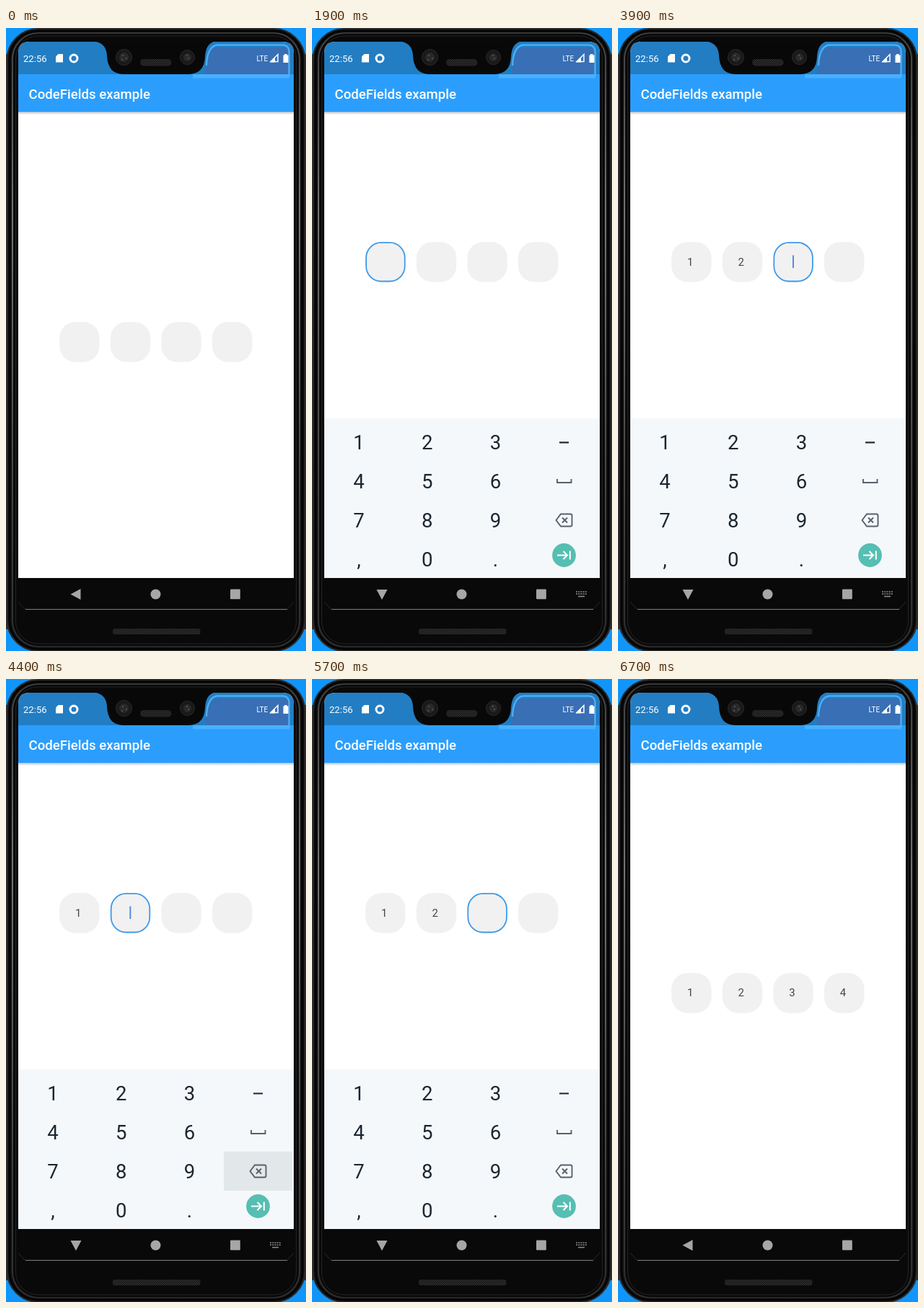
An HTML page that plays this animation: 416x862 px, repeating every 7500 ms.

```html
<!DOCTYPE html>
<html lang="en">
<head>
<meta charset="utf-8">
<title>CodeFields example</title>
<style>
  html, body { margin: 0; width: 100%; height: 100%; overflow: hidden; background: #1095fa; }
  svg { display: block; width: 416px; height: 862px; font-family: Roboto, sans-serif; }
</style>
</head>
<body>
<svg viewBox="0 0 416 862" xmlns="http://www.w3.org/2000/svg">
  <defs>
    <linearGradient id="metal" x1="0" y1="0" x2="0" y2="1">
      <stop offset="0" stop-color="#444"/>
      <stop offset=".3" stop-color="#858585"/>
      <stop offset=".6" stop-color="#5c5c5c"/>
      <stop offset="1" stop-color="#303030"/>
    </linearGradient>
    <linearGradient id="shade" x1="0" y1="0" x2="0" y2="1">
      <stop offset="0" stop-color="#b9c4ce"/>
      <stop offset="1" stop-color="#fff"/>
    </linearGradient>
    <pattern id="mesh" width="3" height="3" patternUnits="userSpaceOnUse">
      <rect width="3" height="3" fill="#2b2b2b"/>
      <path d="M0 3L3 0" stroke="#121212"/>
    </pattern>
    <clipPath id="display"><path d="M17 761V35Q17 19 33 19H383Q399 19 399 35V761Z"/></clipPath>
  </defs>

  <!-- phone body -->
  <rect width="416" height="862" fill="#1095fa"/>
  <path d="M0 36H4V832H0ZM412 36H416V832H412Z" fill="#303030"/>
  <rect x="1.5" y="1" width="413" height="861" rx="43" fill="#151515" stroke="#2b2b2b" stroke-width="2"/>
  <rect x="5" y="4" width="406" height="855" rx="39" fill="none" stroke="#050505" stroke-width="3"/>
  <rect x="9" y="7" width="398" height="849" rx="36" fill="#090909" stroke="url(#metal)" stroke-width="1.7"/>
  <rect x="13.5" y="11" width="389" height="841" rx="31" fill="#090909" stroke="#242424"/>

  <g clip-path="url(#display)">
    <rect x="17" y="19" width="382" height="742" fill="#fff"/>
    <rect x="17" y="116" width="382" height="4" fill="url(#shade)"/>
    <rect x="17" y="64" width="382" height="52" fill="#2b9efd"/>
    <rect x="17" y="19" width="382" height="45" fill="#227dc3"/>
    <path d="M276 64Q280 29 290 27H392V64Z" fill="#386fb5"/>
    <path d="M278 52Q279 25 293 23.5H384Q392 24 392.5 32V67" fill="none" stroke="#4dadf2" stroke-width="2.4"/>
    <rect x="259" y="64" width="134" height="5.5" fill="#48b0ff"/>
    <path d="M118 18Q139 19 140 38Q141 64 163 64H252Q275 64 276 40Q277 19 293 18Z" fill="#080808"/>
    <g id="cells"></g>
    <g id="keyboard">
      <rect x="17" y="540" width="382" height="222" fill="#f5f8fb"/>
      <rect id="press" width="94.7" height="54.2" fill="#e2e8ea"/>
      <g id="keys" font-size="27.5" fill="#1b2630" text-anchor="middle"></g>
      <g fill="none" stroke="#56616a" stroke-width="1.9">
        <path d="M343 573.5H356" stroke="#1b2630" stroke-width="2.2"/>
        <path d="M340 624V629H359.500V624"/>
        <path d="M338.500 681L345 672.500H358.500Q360.500 672.500 360.500 674.500V687.500Q360.500 689.500 358.500 689.500H345ZM347 677.500L354 684.500M354 677.500L347 684.500"/>
      </g>
      <circle cx="349.5" cy="729.5" r="16.4" fill="#56beb2"/>
      <path id="action" fill="none" stroke="#fff" stroke-width="2"/>
    </g>
  </g>

  <!-- status and title bars -->
  <g fill="#fff">
    <text x="24" y="46.500" font-size="13.1">22:56</text>
    <path d="M72.500 36H79V47.500H69V39.500Z"/>
    <circle cx="94" cy="42" r="5" fill="none" stroke="#fff" stroke-width="3"/>
    <text x="347.5" y="45.500" font-size="10">LTE</text>
    <path d="M367 46.500L377 36.500V46.500Z" fill="none" stroke="#fff" stroke-width="1.5"/>
    <path d="M366 47.500L373 40V47.500Z"/>
    <path d="M386 36H389.500V37.500H391.500V48H384.500V37.500H386Z"/>
    <text x="31.500" y="97.500" font-size="18.6" font-weight="500">CodeFields example</text>
  </g>

  <!-- cameras and speakers -->
  <g stroke="#2b2b2b" fill="#191919">
    <circle cx="163.500" cy="40.500" r="11"/>
    <circle cx="251.500" cy="40.500" r="10"/>
    <circle cx="163.500" cy="40.500" r="6" fill="#292929"/>
    <circle cx="251.500" cy="40.500" r="5" fill="#292929"/>
  </g>
  <path d="M161 38h2M166 42h2M160 44h2M250 38h2M252 42h2" stroke="#777"/>
  <rect x="186" y="43" width="43.500" height="9.500" rx="4.700" fill="url(#mesh)"/>
  <rect x="148" y="831" width="121.500" height="8" rx="3" fill="url(#mesh)"/>

  <!-- navigation bar -->
  <path d="M17 794L26 804H390L399 794" fill="none" stroke="#292929"/>
  <path d="M27 804.500H390" stroke="#747474"/>
  <g fill="#a6a6a6">
    <path id="back" d="M89.500 783.500L103.500 776V791Z"/>
    <circle cx="207.500" cy="783.500" r="7"/>
    <rect x="311" y="776.500" width="13.800" height="13.800" rx="1"/>
  </g>
  <g id="imeIcon" fill="none" stroke="#8d8d8d" stroke-width="1.5">
    <path d="M366 780H381M366 783H381" stroke-dasharray="2 1.2"/>
    <path d="M369 786.500H378"/>
  </g>
</svg>

<script>
const LOOP = 7500, STEP = 100;
const OPEN = 1400, DONE = 6400;
const CELL = { x: 74.2, pitch: 70.6, size: 55.4, lowY: 406.8, highY: 296 };
const KEY = { x: 18, y: 545.5, w: 94.7, h: 54.1 };

// [time, entered code]; the field after the last digit takes focus
const ENTRIES = [[OPEN, ''], [2400, '1'], [2900, '12'], [4400, '1'], [5200, '12'], [5900, '123'], [DONE, '1234']];
// [time, length, column, row]
const PRESSES = [[2300, 300, 0, 0], [2800, 400, 1, 0], [4200, 500, 3, 2], [5100, 400, 1, 0], [5800, 400, 2, 0], [6300, 300, 0, 1]];
const NEXT = 'M340 729.500H354M348.500 724L354 729.500L348.500 735M357.800 723.500V735.500';
const CHECK = 'M341.500 730L347 735.500L358 724.500';

const $ = id => document.getElementById(id);
const clamp = v => Math.max(0, Math.min(1, v));

function add(parent, tag, attrs, text = '') {
  const node = document.createElementNS('http://www.w3.org/2000/svg', tag);
  set(node, attrs);
  node.textContent = text;
  parent.append(node);
  return node;
}

function set(node, attrs) {
  for (const name in attrs) node.setAttribute(name, attrs[name]);
}

['123', '456', '789', ',0.'].forEach((row, r) => [...row].forEach((label, c) =>
  add($('keys'), 'text', { x: 65 + c * KEY.w, y: 583 + r * 54 }, label)));

const cells = [0, 1, 2, 3].map(i => {
  const x = CELL.x + i * CELL.pitch;
  return {
    box: add($('cells'), 'rect', { x, y: 0, width: CELL.size, height: CELL.size, rx: 22, fill: '#f1f1f1' }),
    border: add($('cells'), 'rect', { x: x + .9, y: .9, width: CELL.size - 1.8, height: CELL.size - 1.8, rx: 21, fill: 'none', stroke: '#3f9bea', 'stroke-width': 1.8 }),
    digit: add($('cells'), 'text', { x: x + 26, y: 32.5, 'font-size': 14.9, fill: '#444', 'text-anchor': 'middle' }),
    caret: add($('cells'), 'rect', { x: x + 26.6, width: 1.9, fill: '#4c88e0' })
  };
});

function keyboardShown(t) {
  return t < 6500 ? clamp((t - 1400) / 250) : clamp((6700 - t) / 300);
}

function drawCells(t) {
  const [since, code] = ENTRIES.findLast(e => e[0] <= t) || [0, ''];
  const active = t >= OPEN && t < DONE ? code.length : -1;
  const raised = t >= 1600 && t < 6500;
  const caretOn = (t - since) % 1000 < 500;
  set($('cells'), { transform: `translate(0 ${raised ? CELL.highY : CELL.lowY})` });
  cells.forEach((cell, i) => {
    const focused = i === active;
    cell.digit.textContent = code[i] || '';
    set(cell.border, { opacity: +(focused && t > OPEN) });
    set(cell.caret, { opacity: +(focused && caretOn), y: raised ? 18.5 : 20.5, height: raised ? 17.5 : 14 });
  });
  set($('action'), { d: code.length > 2 ? CHECK : NEXT });
}

function drawKeyboard(t) {
  const shown = keyboardShown(t);
  set($('keyboard'), { opacity: shown, transform: `translate(0 ${22 * (1 - shown)})` });
  set($('back'), { transform: `rotate(${-90 * shown} 97 783.5)` });
  set($('imeIcon'), { opacity: +(t >= OPEN && t < DONE) });

  const press = PRESSES.find(([start, length]) => t >= start && t < start + length);
  if (press) {
    const [start, length, column, row] = press;
    set($('press'), { x: KEY.x + column * KEY.w, y: KEY.y + row * KEY.h, opacity: clamp((start + length - t) / 200) });
  } else {
    set($('press'), { opacity: 0 });
  }
}

function draw(ms) {
  const t = Math.floor(ms % LOOP / STEP) * STEP;
  drawCells(t);
  drawKeyboard(t);
}

const begin = performance.now();
function tick() {
  draw(performance.now() - begin);
  requestAnimationFrame(tick);
}
tick();
</script>
</body>
</html>
```
